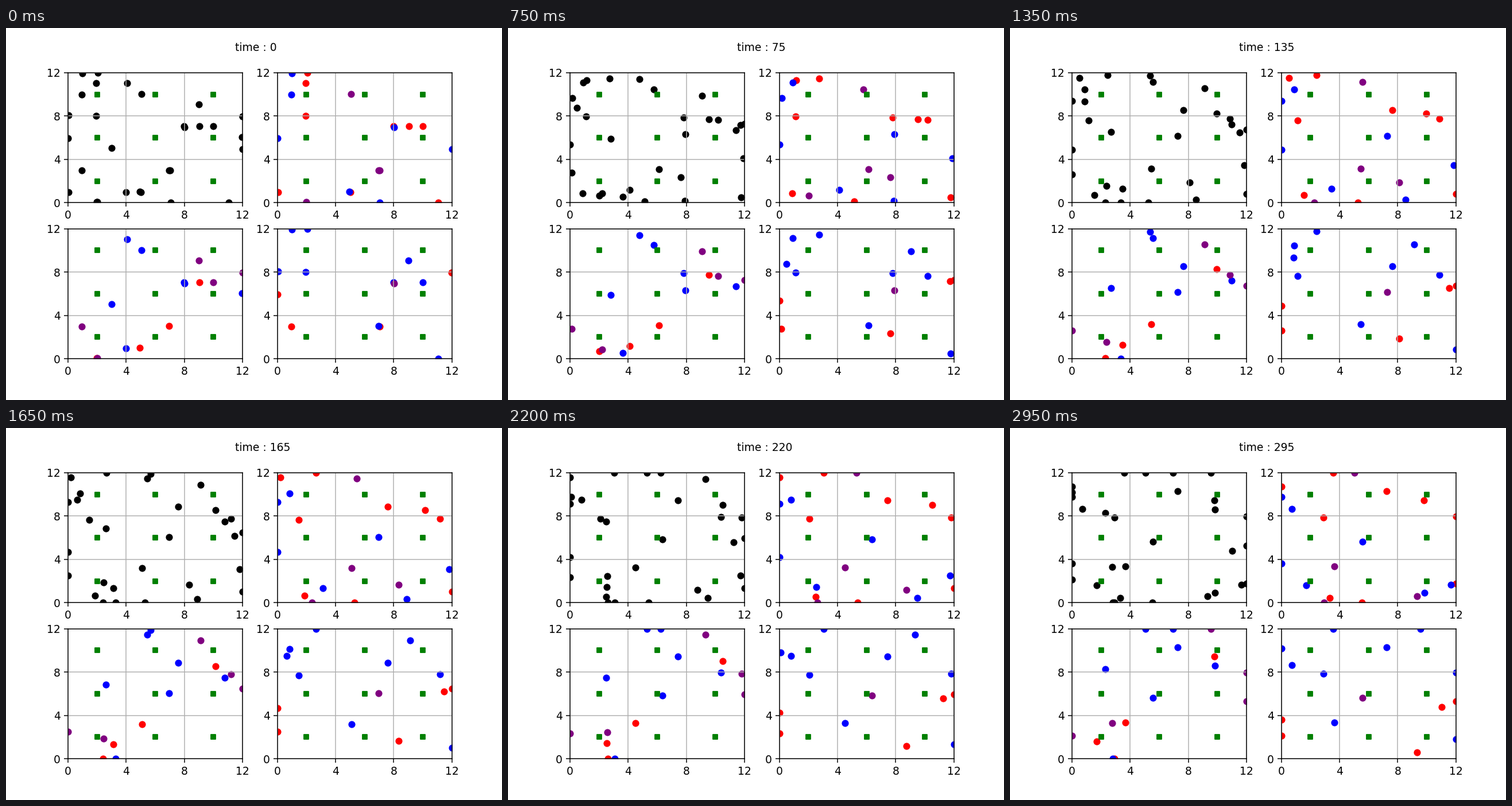
These frames come from a looping animation (864x648 px, 3 s). A matplotlib script:

```python
import numpy as np
import matplotlib.pyplot as plt
from matplotlib.animation import FuncAnimation

FRAMES = 60
INTERVAL = 50
TIME_STEP = 5
SIZE = 12
SPEED = 0.056
COLORS = {"r": "red", "b": "blue", "p": "purple"}

groups = []
paths = []


def walk(group, x, y, heading, *turns):
    """Walk from a grid point at constant speed, sliding along the walls.

    group gives the colour in each side panel; turns are (frame, heading).
    """
    turns = dict(turns)
    pos = np.array([x, y], float)
    path = []
    for frame in range(FRAMES):
        angle = np.radians(heading)
        step = SPEED * np.array([np.cos(angle), np.sin(angle)])
        pos = np.clip(pos + step, 0, SIZE)
        path.append(pos)
        heading = turns.get(frame, heading)
    groups.append(group)
    paths.append(path)


walk("b-b", 1, 12, 265)
walk("r-b", 2, 12, 323, (15, 164), (23, 50))
walk("r--", 2, 11, 162, (41, 270))
walk("b--", 1, 10, 202, (43, 132))
walk("--b", 0, 8, 57, (28, 152))
walk("r-b", 2, 8, 184, (18, 275), (24, 8))
walk("b-r", 0, 6, 225)
walk("-pr", 1, 3, 195)
walk("r--", 0, 1, 350)
walk("pr-", 2, 0, 112, (10, 20), (15, 291))
walk("-p-", 2, 0, 77)
walk("-b-", 4, 1, 257, (10, 152), (16, 252))
walk("br-", 5, 1, 170)
walk("r--", 5, 1, 279)
walk("-b-", 3, 5, 102)
walk("pb-", 5, 10, 32, (15, 107))
walk("-b-", 4, 11, 28)
walk("prb", 7, 3, 174)
walk("p-r", 7, 3, 314)
walk("b--", 7, 0, 10, (52, 103))
walk("r-b", 11, 0, 32)
walk("rbb", 8, 7, 103)
walk("bbp", 8, 7, 288, (10, 197))
walk("rr-", 9, 7, 53, (44, 149))
walk("rpb", 10, 7, 98, (10, 7))
walk("-pb", 9, 9, 86, (41, 30), (49, 90))
walk("-pr", 12, 8, 306)
walk("-b-", 12, 6, 130)
walk("--r", 12, 8, 253)
walk("b--", 12, 5, 264)

paths = np.array(paths)
everyone = np.arange(len(paths))

fig, axes = plt.subplots(2, 2, figsize=(6.4, 4.8), dpi=135)
fig.subplots_adjust(right=0.899, bottom=0.111)
axes = axes.ravel()
posts = np.meshgrid([2, 6, 10], [2, 6, 10])
layers = []


def add_layer(ax, members, color):
    x, y = paths[members, 0].T
    layers.append((ax.scatter(x, y, s=30, color=color), members))


add_layer(axes[0], everyone, "black")
for i, ax in enumerate(axes[1:]):
    for key, color in COLORS.items():
        add_layer(ax, [n for n in everyone if groups[n][i] == key], color)

ticks = range(0, SIZE + 1, 4)
for ax in axes:
    ax.scatter(*posts, s=15, marker="s", color="green")
    ax.set(xlim=(0, SIZE), ylim=(0, SIZE), xticks=ticks, yticks=ticks)
    ax.grid(True)

clock = axes[0].text(11.5, 14, "time : 0")


def update(frame):
    for dots, members in layers:
        dots.set_offsets(paths[members, frame])
    clock.set_text(f"time : {frame * TIME_STEP}")


anim = FuncAnimation(fig, update, frames=FRAMES, interval=INTERVAL,
                     repeat=True, repeat_delay=0)
plt.show()
```
